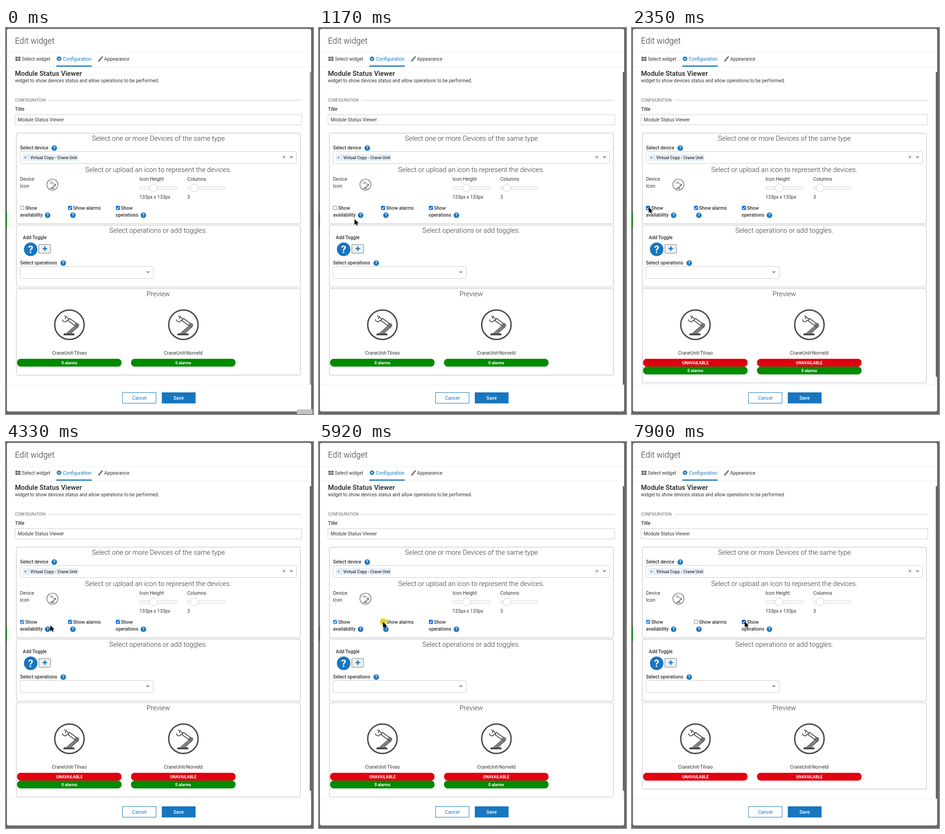
Animation of 668x839 px, one loop 8 s. Source, as an HTML page:

```html
<!DOCTYPE html>
<html lang="en">
<head>
<meta charset="utf-8">
<title>Edit widget</title>
<style>
  html, body { margin: 0; width: 100%; height: 100%; overflow: hidden; background: #666; }
  svg { display: block; width: 668px; height: 839px; font: 10.35px Roboto, Arial, sans-serif; fill: #333; }
  .h { font-size: 14.86px; font-weight: 300; text-anchor: middle; }
  .b { font-weight: 500; }
  .mid { text-anchor: middle; }
  .badge { font-size: 8.8px; font-weight: 700; text-anchor: middle; fill: #fff; }
  .panel { fill: #fff; stroke: #bcbcbc; }
  .field { fill: #fff; stroke: #ccc; }
  .blue { fill: #1776bf; }
  .arm { fill: none; stroke: #4a4a4a; stroke-width: 1.8; stroke-linejoin: round; stroke-linecap: round; }
  .box { fill: #0b6fe0; stroke: #0b6fe0; }
  .tick { fill: none; stroke: #fff; stroke-width: 1.5; }

  .anim { animation: 8s step-end infinite; }
  #tip { animation-name: tip; }
  #bar { animation-name: bar; }
  #preview { animation-name: preview; }
  #avail { animation-name: avail; }
  #alarm { animation-name: alarm; }
  #ops { animation-name: ops; }
  .down { animation-name: down; }
  .count { animation-name: count; }
  #glow { animation-name: glow; }
  #cursor { animation-name: cursor; }

  @keyframes tip { 0% { opacity: 1 } 2.25%, 100% { opacity: 0 } }
  @keyframes bar {
    0% { fill: #a2a4a6; height: 679px }
    7.25% { fill: #63676b; height: 679px }
    29.375% { fill: #63676b; height: 662px }
    76.5%, 100% { fill: #63676b; height: 679px }
  }
  @keyframes preview {
    0% { height: 188px }
    29.375% { height: 205px }
    76.5%, 100% { height: 188px }
  }
  @keyframes avail {
    0% { fill: #fff; stroke: #767676 }
    22% { fill: #fff; stroke: #4a4a4a }
    29.375% { fill: #0859b5; stroke: #0859b5 }
    54.125%, 100% { fill: #3888e4; stroke: #3888e4 }
  }
  @keyframes alarm {
    0% { fill: #0b6fe0; stroke: #0b6fe0 }
    64.125% { fill: #0859b5; stroke: #0859b5 }
    76.5% { fill: #fff; stroke: #4a4a4a }
    96.25%, 100% { fill: #fff; stroke: #767676 }
  }
  @keyframes ops {
    0% { fill: #0b6fe0; stroke: #0b6fe0 }
    98.75%, 100% { fill: #0859b5; stroke: #0859b5 }
  }
  @keyframes down { 0% { opacity: 0 } 29.375%, 100% { opacity: 1 } }
  @keyframes count {
    0% { transform: none; opacity: 1 }
    29.375% { transform: translateY(17px); opacity: 1 }
    76.5%, 100% { transform: none; opacity: 0 }
  }
  @keyframes glow {
    0% { transform: translate(-50px, 0) }
    26.875% { transform: translate(36.5px, 389.5px) }
    29.375% { transform: translate(-50px, 0) }
    74% { transform: translate(140.5px, 390.5px) }
    76.5%, 100% { transform: translate(-50px, 0) }
  }
  @keyframes cursor {
    0% { transform: translate(700px, 839px) }
    7.25% { transform: translate(648px, 825px) }
    9.75% { transform: translate(553px, 549px) }
    12.125% { transform: translate(248px, 437px) }
    14.625% { transform: translate(77px, 415px) }
    17.125% { transform: translate(39px, 411px) }
    19.5% { transform: translate(35px, 398px) }
    22% { transform: translate(35px, 393px) }
    24.5% { transform: translate(36px, 389px) }
    54.125% { transform: translate(96px, 398px) }
    56.625% { transform: translate(150px, 400px) }
    59.125% { transform: translate(131px, 392px) }
    61.625% { transform: translate(130px, 391px) }
    64.125% { transform: translate(137px, 391px) }
    66.625% { transform: translate(140px, 391px) }
    69.125% { transform: translate(139px, 391px) }
    96.25% { transform: translate(218px, 398px) }
    98.75%, 100% { transform: translate(245px, 390px) }
  }
</style>
</head>
<body>
<svg viewBox="0 0 668 839">
  <defs>
    <g id="help">
      <circle class="blue" r="6"/>
      <text class="mid" y="3.3" style="font-size:9.2px;font-weight:700;fill:#fff">?</text>
    </g>
    <g id="robot">
      <circle r="32" fill="#fff" stroke="#4a4a4a" stroke-width="3"/>
      <path d="M-13 23v-1.5q0-3 3-3H8q3 0 3 3V23z" fill="#4a4a4a"/>
      <path class="arm" d="M-5 18 12 3M3 18 18 5M-1 18 14 5"/>
      <path class="arm" d="M0-14 15-3M-3-9 12 2M0-14-3-9"/>
      <path class="arm" d="M-2-12-7-18-11-19M-7-18-9-13M-4-10-9-6-14-8-15-11"/>
      <circle cx="16.5" cy="1" r="4.6" fill="#4a4a4a"/>
      <circle cx="16.5" cy="1" r="2.5" fill="none" stroke="#ddd" stroke-width=".9"/>
    </g>
    <path id="caret" d="M-4.5-2h9L0 2.5z" fill="#999"/>
    <path id="tick" class="tick" d="M2 4.8 3.9 6.7 7.4 2.4"/>
  </defs>

  <!-- Backdrop and dialog -->
  <path d="M0 401h2v32H0z" fill="#007a00"/>
  <rect x="2" y="2" width="662" height="831.5" rx="4" fill="#fff"/>
  <rect id="tip" class="anim" x="633" y="829" width="34" height="10" fill="#c3c3c3"/>
  <text x="19.5" y="34" style="font-size:17.83px;font-weight:300">Edit widget</text>
  <path d="M2 53.5H664M2 84.5H664M2 775.5H664" stroke="#efefef"/>

  <!-- Tabs -->
  <path d="M20.5 62.5h5v4h-5zm6 0h5v4h-5zm-6 5h5v4h-5zm6 0h5v4h-5z" fill="#666"/>
  <text x="34.5" y="71">Select widget</text>
  <g transform="translate(115.3 66.8)">
    <circle r="4.6" fill="none" stroke="#1776bf" stroke-width="1.6" stroke-dasharray="1.9 1.71"/>
    <circle r="2.8" fill="none" stroke="#1776bf" stroke-width="2.4"/>
  </g>
  <text class="blue" x="124" y="71">Configuration</text>
  <path class="blue" d="M109.5 81.5h77v2.5h-77z"/>
  <path d="M209 61.5q2.3-.6 1.8 1.5l-4.6 6-2.4-2.2zM203.300 67.400l2.400 2.200q-.4 3.500-6 3 1.700-1 1.700-3 .4-1.900 1.900-2.200z" fill="#666"/>
  <text x="213.500" y="71">Appearance</text>

  <!-- Heading and title -->
  <text class="b" x="19.5" y="104" style="font-size:14.86px;fill:#222">Module Status Viewer</text>
  <text x="19.5" y="118" style="font-size:10.28px">widget to show devices status and allow operations to be performed.</text>
  <text x="19.5" y="160" style="font-size:8.7px;fill:#666">CONFIGURATION</text>
  <path d="M92 157H643.5" stroke="#c4c4c4"/>
  <text class="b" x="19.5" y="180">Title</text>
  <rect class="field" x="19.5" y="188.5" width="624" height="22"/>
  <text x="25.5" y="202.700">Module Status Viewer</text>

  <!-- Devices -->
  <rect class="panel" x="22.5" y="228.5" width="618" height="197" rx="2.5"/>
  <text class="h" x="331.5" y="245.300">Select one or more Devices of the same type</text>
  <text class="b" x="30.500" y="264">Select device</text>
  <use href="#help" x="105" y="261"/>
  <rect class="field" x="30.5" y="268.5" width="602" height="26" rx="2.5"/>
  <rect x="36" y="274" width="121" height="15" rx="1.5" fill="#e7f0fa"/>
  <path d="M48.500 274v15" stroke="#cfe0f2"/>
  <path d="M40.500 279.800l3.400 3.400m0-3.400l-3.400 3.400" stroke="#333"/>
  <text class="b" x="53" y="284.700" style="font-size:9.3px">Virtual Copy - Crane Unit</text>
  <path d="M602 278l5.400 5.400m0-5.400l-5.400 5.400" stroke="#888" stroke-width="1.300"/>
  <use href="#caret" x="621" y="281"/>

  <text class="h" x="331.300" y="313">Select or upload an icon to represent the devices.</text>
  <text x="30.500" y="332.300">Device</text>
  <text x="30.500" y="346.800">Icon</text>
  <use href="#robot" transform="translate(101 340.500) scale(.375)"/>
  <text x="290.500" y="332.300">Icon Height</text>
  <text x="394.500" y="332.300">Columns</text>
  <rect class="field" x="290.500" y="345.500" width="82" height="5" rx="2"/>
  <rect class="field" x="394.500" y="345.500" width="82" height="5" rx="2"/>
  <circle class="field" cx="320.500" cy="347.500" r="8.500"/>
  <circle class="field" cx="409.500" cy="347.500" r="8.500"/>
  <text x="290.500" y="370.800">133px x 133px</text>
  <text x="394.500" y="370.800">3</text>

  <!-- Checkboxes -->
  <rect id="avail" class="box anim" x="31" y="387" width="8" height="8" rx="1.200"/>
  <use href="#tick" x="30.300" y="386.500"/>
  <rect id="alarm" class="box anim" x="135.500" y="387" width="8" height="8" rx="1.200"/>
  <use href="#tick" x="134.800" y="386.500"/>
  <rect id="ops" class="box anim" x="239.500" y="387" width="8" height="8" rx="1.200"/>
  <use href="#tick" x="238.800" y="386.500"/>
  <g class="b">
    <text x="42" y="395.300">Show</text>
    <text x="30.500" y="410.300">availability</text>
    <text x="146" y="395.300">Show alarms</text>
    <text x="250" y="395.300">Show</text>
    <text x="238.500" y="410.300">operations</text>
  </g>
  <use href="#help" x="90.500" y="407"/>
  <use href="#help" x="145.500" y="407"/>
  <use href="#help" x="299" y="407"/>

  <!-- Operations -->
  <rect class="panel" x="22.5" y="428.5" width="618" height="134.500" rx="2.5"/>
  <text class="h" x="331.300" y="445">Select operations or add toggles.</text>
  <text class="b" x="36.500" y="459">Add Toggle</text>
  <use href="#help" transform="translate(53.700 481) scale(2.450)"/>
  <rect x="71.500" y="470.500" width="25.500" height="19" rx="1.500" fill="#efefef" stroke="#767676"/>
  <path d="M79.500 479.500h10m-5-5v10" stroke="#1776bf" stroke-width="2.600"/>
  <text class="b" x="30.500" y="514">Select operations</text>
  <use href="#help" x="124.500" y="511"/>
  <rect class="field" x="30.500" y="518.500" width="290" height="26" rx="2.500"/>
  <use href="#caret" x="308.500" y="531"/>

  <!-- Preview -->
  <rect id="preview" class="panel anim" x="22.500" y="566.500" width="618" height="188" rx="2.500"/>
  <text class="h" x="331.300" y="583">Preview</text>
  <use href="#robot" x="138" y="645"/>
  <use href="#robot" x="386" y="645"/>
  <text class="mid" x="138" y="710">CraneUnit-Tilvao</text>
  <text class="mid" x="385.700" y="710">CraneUnit-Norveld</text>
  <g class="down anim">
    <rect x="24" y="719" width="227.500" height="17" rx="8" fill="#e1000f"/>
    <rect x="272" y="719" width="227.500" height="17" rx="8" fill="#e1000f"/>
    <text class="badge" x="138" y="730.600">UNAVAILABLE</text>
    <text class="badge" x="385.700" y="730.600">UNAVAILABLE</text>
  </g>
  <g class="count anim">
    <rect x="24" y="719" width="227.500" height="17" rx="8" fill="#008a00"/>
    <rect x="272" y="719" width="227.500" height="17" rx="8" fill="#008a00"/>
    <text class="badge" x="138" y="730.600">0 alarms</text>
    <text class="badge" x="385.700" y="730.600">0 alarms</text>
  </g>

  <!-- Footer and scrollbar -->
  <rect x="253.500" y="792.500" width="73" height="23" fill="#fff" stroke="#1776bf"/>
  <text class="mid blue" x="290" y="808">Cancel</text>
  <path class="blue" d="M339 792h73.500v24H339z"/>
  <text class="mid b" x="375.500" y="808" style="fill:#fff">Save</text>
  <path d="M661 96h3v679h-3z" fill="#eee"/>
  <rect id="bar" class="anim" x="661" y="96" width="3" height="679"/>

  <!-- Pointer -->
  <circle id="glow" class="anim" r="8.500" fill="#efe02c" fill-opacity=".8"/>
  <path id="cursor" class="anim" d="M.3.300V13L3.200 10.300 5.200 14.600 7.300 13.600 5.300 9.500H9.500z" fill="#000"/>
</svg>
</body>
</html>
```
